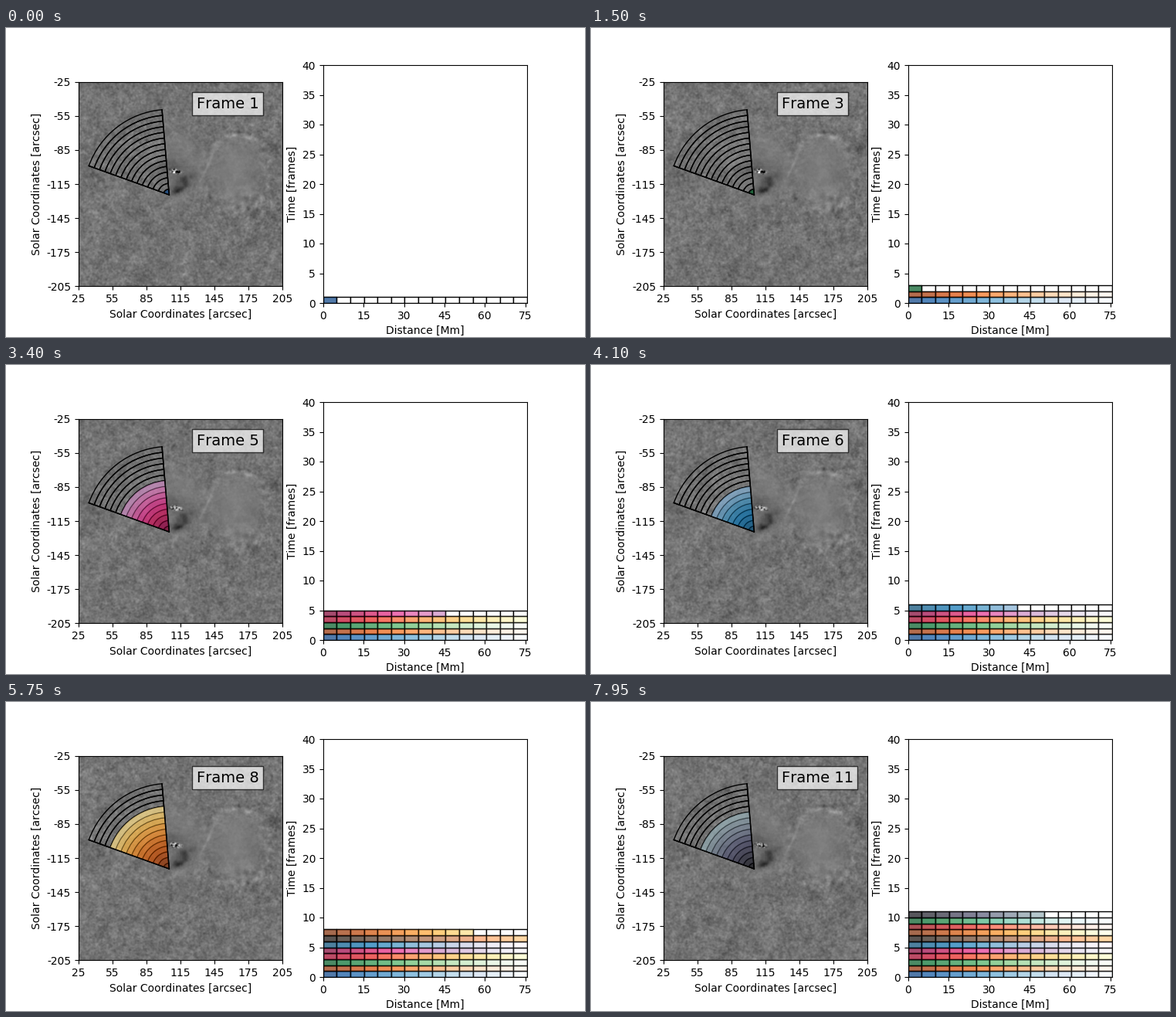
Write a matplotlib script that moves like this. It is 750x400 px and loops after 8 s.

```python
import numpy as np
import matplotlib.pyplot as plt
from matplotlib.animation import FuncAnimation
from matplotlib.collections import PatchCollection, PolyCollection
from matplotlib.patches import Wedge

plt.rcParams["font.family"] = "DejaVu Sans"
plt.rcParams["text.kerning_factor"] = 6

CELLS, ROWS = 15, 11
STEPS = 160
ALPHA = 0.7
MAPS = ["Blues_r", "Oranges_r", "Greens_r", "YlOrRd_r", "PuRd_r", "PuBu_r",
        "copper", "YlOrBr_r", "Reds_r", "BuGn_r", "bone"]
APEX = (105.1, -124.5)
RING = 5.02
ANGLES = (94.8, 160.2)
STEP_MM = 5.046
SIZE = 264


# --- solar surface -------------------------------------------------------
gy, gx = np.mgrid[0:SIZE, 0:SIZE].astype(float)
freq = np.fft.fftfreq(SIZE)
freq2 = freq[:, None] ** 2 + freq[None, :] ** 2


def noise(seed, sigma):
    """Blurred unit-variance noise."""
    raw = np.random.default_rng(seed).normal(size=(SIZE, SIZE))
    out = np.fft.ifft2(np.fft.fft2(raw) * np.exp(-2 * np.pi**2 * sigma**2 * freq2)).real
    return out / out.std()


def blob(x, y, rx, ry, tilt=0, power=1):
    a = np.radians(tilt)
    u = (gx - x) * np.cos(a) + (gy - y) * np.sin(a)
    v = -(gx - x) * np.sin(a) + (gy - y) * np.cos(a)
    return np.exp(-((u / rx) ** 2 + (v / ry) ** 2) ** power)


spot = blob(202, 116, 40, 48, 0, 1.6)
penumbra = blob(130, 108, 34, 52, 0, 1.5)
calm = np.clip(1 - 0.75 * spot - 0.65 * penumbra, 0.2, 1)
radius = np.hypot((gx - 204) / 44, (gy - 118) / 50)
angle = np.arctan2(gy - 118, gx - 204)
rim = np.exp(-((radius - 1) / 0.09) ** 2)
grain = noise(1, 0.9)
patchy = noise(2, 2.5)
broad = noise(3, 7)

base = 114 + 8 * spot + 5 * penumbra * (gy < 110) + 2.5 * broad
base += rim * np.where(np.sin(angle) < -0.3, 8 + 8 * patchy, 2 + 6 * patchy)
base += 26 * blob(199, 69, 7, 3) + 14 * blob(219, 73, 6, 3)
base += 16 * blob(166, 108, 20, 1.6, -65)
base += 12 * blob(90, 163, 24, 4, 20) + 14 * blob(120, 155, 12, 4, -30)
base -= 25 * blob(252, 88, 8, 7) + 22 * blob(172, 78, 8, 3, -20)
base -= 22 * blob(203, 66, 15, 3)
base += 8 * blob(220, 160, 22, 24) * patchy
base -= 52 * blob(134, 131, 16, 7, -40) * (1 + 0.3 * patchy)
base -= 45 * blob(129, 140, 6, 3, -25)
base -= 18 * blob(122, 110, 14, 9)
speck = blob(125, 116, 8, 3.5, 10, 2)


def surface(k):
    texture = 5 * grain + 3.5 * patchy + 5 * noise(20 + k, 1.1) + 3 * noise(50 + k, 3)
    img = base + calm * texture
    img += speck * (60 * noise(80 + k // 3, 0.8) + 25)
    return np.clip(img, 0, 255)


surfaces = [surface(k) for k in range(ROWS)]

# --- layout --------------------------------------------------------------
fig, (sun, chart) = plt.subplots(1, 2, figsize=(7.5, 4), dpi=100)

image = sun.imshow(surfaces[0], cmap="gray", vmin=0, vmax=255,
                   extent=(25, 205, -205, -25), interpolation="nearest")
ticks = range(25, 206, 30)
sun.set_xticks(ticks, [str(t) for t in ticks])
sun.set_yticks([-t for t in ticks], [f"-{t}" for t in ticks])
sun.set_xlabel("Solar Coordinates [arcsec]")
sun.set_ylabel("Solar Coordinates [arcsec]")
label = sun.text(129.1, -48, "", fontsize=14,
                 bbox=dict(facecolor="white", alpha=0.7))

chart.set_xlim(0, CELLS * STEP_MM)
chart.set_ylim(0, 40)
chart.set_xticks(range(0, 76, 15))
chart.set_yticks(range(0, 41, 5))
chart.set_xlabel("Distance [Mm]")
chart.set_ylabel("Time [frames]")


# --- moving parts --------------------------------------------------------
def add(ax, coll):
    ax.add_collection(coll, autolim=False)
    return coll


rings = [Wedge(APEX, (i + 1) * RING, *ANGLES, width=RING) for i in range(CELLS)]
add(sun, PatchCollection(rings, facecolor="none", edgecolor="black", linewidths=1))
ring_tint = add(sun, PatchCollection(rings, edgecolor=(0, 0, 0, 0.3), linewidths=0.5))
for deg in ANGLES:
    a = np.radians(deg)
    reach = CELLS * RING
    sun.plot([APEX[0], APEX[0] + reach * np.cos(a)],
             [APEX[1], APEX[1] + reach * np.sin(a)],
             color="black", lw=1.1, scalex=False, scaley=False)


def cell(row, i):
    x0, x1 = i * STEP_MM, (i + 1) * STEP_MM
    return [(x0, row), (x1, row), (x1, row + 1), (x0, row + 1)]


boxes = [cell(r, i) for r in range(ROWS) for i in range(CELLS)]
grid = add(chart, PolyCollection(boxes, facecolor="white", edgecolor="black",
                                 linewidths=1))
tint = add(chart, PolyCollection(boxes, linewidths=1))

shades = np.array([plt.get_cmap(m)(np.arange(1, CELLS + 1) / CELLS) for m in MAPS])
shades[..., 3] = ALPHA
shades = shades.reshape(-1, 4)


def update(n):
    row, col = divmod(n, CELLS)
    image.set_data(surfaces[row])
    label.set_text(f"Frame {row + 1}")

    start = row * CELLS
    ring_tint.set_paths(rings[:col + 1])
    ring_tint.set_facecolor(shades[start:n + 1])

    grid.set_verts(boxes[:start + CELLS])
    tint.set_verts(boxes[:n + 1])
    tint.set_facecolor(shades[:n + 1])
    tint.set_edgecolor((0, 0, 0, ALPHA))
    return image, label, ring_tint, grid, tint


anim = FuncAnimation(fig, update, frames=STEPS, interval=50, repeat=True,
                     repeat_delay=0, blit=False)
plt.show()
```
